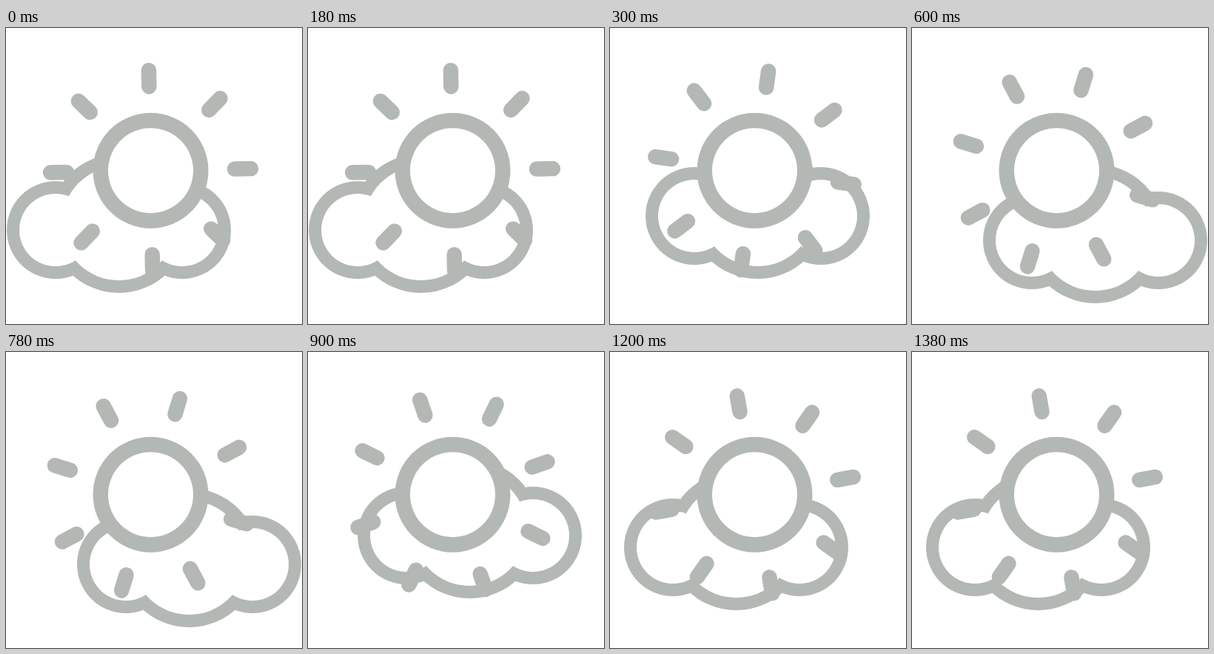
These frames come from a looping animation (400 px wide and 400 px high, 1.5 s). An HTML page with a canvas:

```html
<!DOCTYPE html>
<html lang="en">
<head>
<meta charset="utf-8">
<title>Sun and cloud</title>
<style>
  html, body { margin: 0; width: 100%; height: 100%; overflow: hidden; background: #fff; }
  canvas { display: block; }
</style>
</head>
<body>
<canvas id="stage" width="400" height="400"></canvas>
<script>
const ctx = document.getElementById('stage').getContext('2d');
const GREY = '#b4b8b5';
const STEP = 300;
const SUN = { x: 195.5, y: 192.7 };

// Cloud offset for each held pose
const drift = [[-47, 19], [0, 0], [48, 33], [19, -6], [-29, 10]];

// Cloud lobes: x, y, outer radius
const lobes = [[114, 254, 66], [199.5, 245, 94], [285, 254, 66]];

function disc(x, y, r, color) {
  ctx.fillStyle = color;
  ctx.beginPath();
  ctx.arc(x, y, r, 0, Math.PI * 2);
  ctx.fill();
}

function drawCloud([dx, dy]) {
  for (const [x, y, r] of lobes) disc(x + dx, y + dy, r, GREY);
  for (const [x, y, r] of lobes) disc(x + dx, y + dy, r - 17, '#fff');
}

function drawSun(degrees) {
  ctx.save();
  ctx.translate(SUN.x, SUN.y);
  disc(0, 0, 78, GREY);
  disc(0, 0, 57.5, '#fff');
  ctx.rotate(degrees * Math.PI / 180);
  ctx.strokeStyle = GREY;
  ctx.lineWidth = 20.5;
  ctx.lineCap = 'round';
  for (let i = 0; i < 8; i++) {
    ctx.beginPath();
    ctx.moveTo(0, -113.5);
    ctx.lineTo(0, -135.5);
    ctx.stroke();
    ctx.rotate(Math.PI / 4);
  }
  ctx.restore();
}

function draw(now) {
  const pose = Math.floor(now / STEP) % drift.length;
  ctx.fillStyle = '#fff';
  ctx.fillRect(0, 0, 400, 400);
  drawCloud(drift[pose]);
  drawSun(pose * 9 - 1.1);
}

const start = performance.now();
function tick() {
  draw(performance.now() - start);
  requestAnimationFrame(tick);
}
tick();
</script>
</body>
</html>
```
